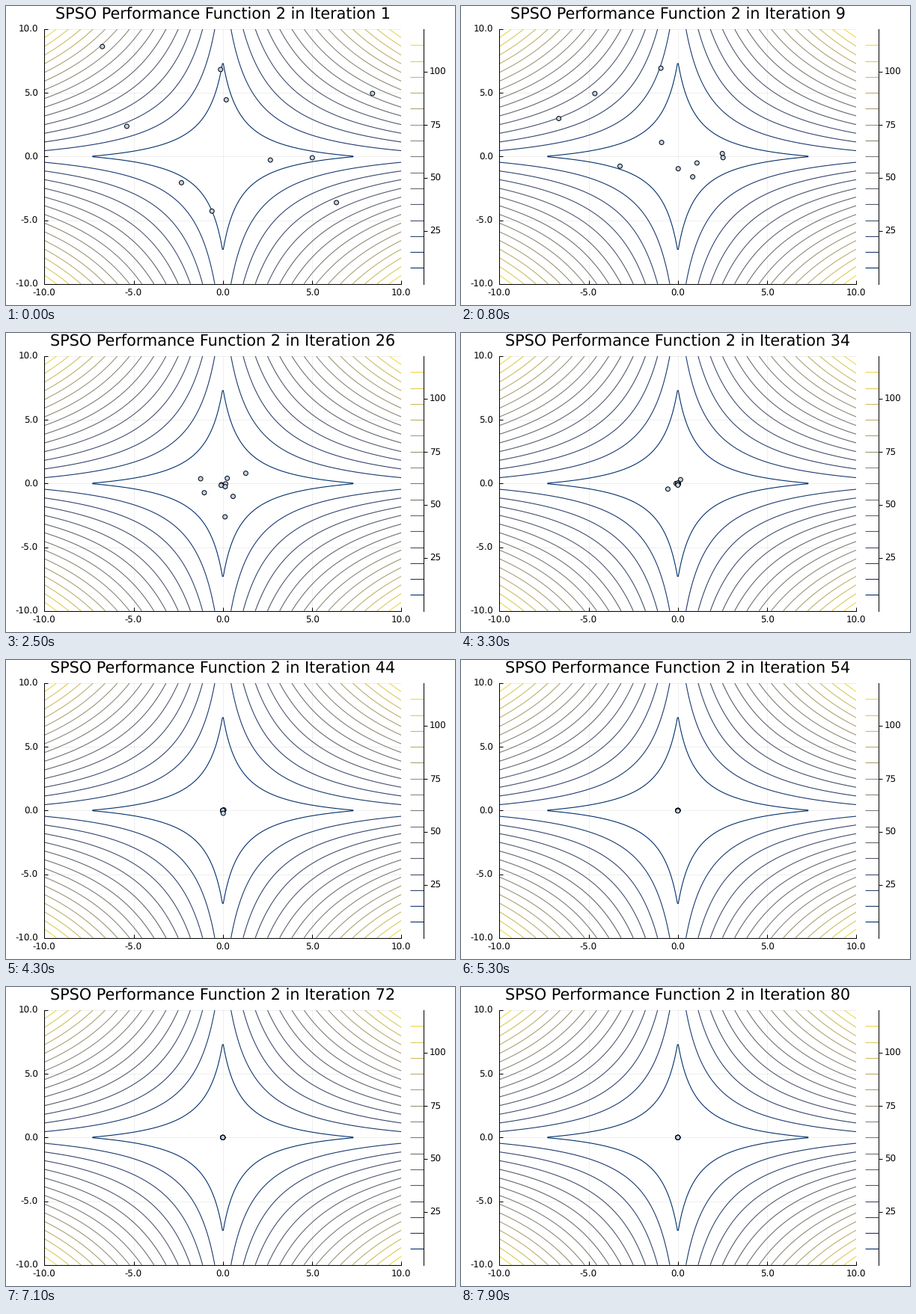
Animation, 600 px wide and 400 px high, one loop 8000 ms. Source, as a matplotlib script:

```python
import matplotlib.pyplot as plt
import numpy as np
from matplotlib.animation import FuncAnimation

W, H, DPI = 600, 400, 100
PX = 72 / DPI
FRAMES, INTERVAL = 80, 100
LEFT, RIGHT, TOP, BOTTOM = 51.2, 528.4, 30.9, 371.7

plt.rcParams.update({"font.family": "DejaVu Sans", "text.hinting": "none"})

# Swarm positions (x + iy) at shared iterations, one entry per particle.
POSES = {
    0: [-6.75 + 8.63j, -0.13 + 6.83j, 0.19 + 4.45j, 8.38 + 4.95j, -5.38 + 2.37j,
        2.66 - 0.28j, 5.01 - 0.10j, -2.32 - 2.06j, -0.61 - 4.29j, 6.36 - 3.62j],
    8: [-4.65 + 4.94j, -0.95 + 6.93j, -0.91 + 1.10j, 2.49 + 0.23j, -6.67 + 2.98j,
        1.07 - 0.51j, 2.53 - 0.09j, -3.24 - 0.76j, 0.02 - 0.96j, 0.83 - 1.60j],
    17: [-5.12 + 4.92j, -0.38 + 1.22j, 0.02 + 0.17j, 1.19 + 0.79j, -0.57 + 0.08j,
         0.10 - 0.21j, 0.38 - 0.25j, -0.48 - 0.60j, 0.21 - 0.50j, 0.34 - 2.44j],
    33: [-0.56 - 0.44j, 0.15 + 0.30j, 0.02 + 0.03j, -0.10, -0.02,
         0.02 - 0.05j, 0.03, -0.01 + 0.02j, -0.10j, -0.13j],
}
# Wide swings of single particles between the shared poses.
SWINGS = {
    0: {4: -8.5 + 6j, 12: -3.2 + 5.6j, 22: 1.8 + 0.5j, 27: -1.2 + 0.6j},
    1: {12: 0.8 - 3j, 23: 0.5 - 0.9j},
    3: {4: -1 + 2j, 12: -1.2 - 0.5j},
    4: {4: -10 + 1.5j, 12: 2.5 - 1j},
    6: {3: 10 + 1j},
    7: {12: 2.1 + 0.8j},
    9: {4: 3 - 10j, 13: -0.5 - 9.27j, 21: 0.3 - 3.64j, 28: -1.41j,
        37: -0.53j, 43: 0.02 - 0.22j, 46: -0.18j},
}


def hermite(knots, t):
    """Smooth path through {time: point}, evaluated at times t."""
    k = np.array(sorted(knots), float)
    z = np.array([knots[i] for i in sorted(knots)], complex)
    m = np.gradient(z, k)
    i = np.clip(np.searchsorted(k, t, side="right") - 1, 0, len(k) - 2)
    h = k[i + 1] - k[i]
    u = (t - k[i]) / h
    return ((1 + 2 * u) * (1 - u) ** 2 * z[i] + u * (1 - u) ** 2 * h * m[i]
            + u * u * (3 - 2 * u) * z[i + 1] + u * u * (u - 1) * h * m[i + 1])


def track(p):
    knots = {n: pose[p] for n, pose in POSES.items()}
    knots.update({43: -0.1 * POSES[33][p], 55: 0, 67: 0, FRAMES: 0})
    knots.update(SWINGS.get(p, {}))
    z = hermite(knots, np.arange(FRAMES))
    return np.clip(np.column_stack([z.real, z.imag]), -10, 10)


tracks = np.array([track(p) for p in range(10)])

fig = plt.figure(figsize=(W / DPI, H / DPI), dpi=DPI, facecolor="white")


def panel(x0, x1):
    return fig.add_axes([x0 / W, 1 - BOTTOM / H, (x1 - x0) / W, (BOTTOM - TOP) / H])


def label(x, y, text, size=11.85, ha="center"):
    return fig.text(x / W, 1 - y / H, text, fontsize=size * PX, ha=ha, va="baseline")


# Contours of |x| + |y| + |x||y|
levels = np.arange(1, 16) * 7.5
ax = panel(LEFT, RIGHT)
g = np.linspace(-10, 10, 400)
X, Y = np.abs(np.meshgrid(g, g))
ax.contour(g, g, X + Y + X * Y, levels, cmap="cividis", vmin=0, vmax=120,
           linewidths=1.1 * PX)
ax.set(xlim=(-10, 10), ylim=(-10, 10))
ticks = np.arange(-10, 11, 5)
ax.set_xticks(ticks, [])
ax.set_yticks(ticks, [])
ax.tick_params(direction="in", length=4.7 * PX, width=PX)
ax.set_axisbelow(True)
ax.grid(color="black", alpha=0.1, lw=0.6 * PX)
ax.spines[["top", "right"]].set_visible(False)
ax.spines[["left", "bottom"]].set_linewidth(PX)
for v in ticks:
    f = (v + 10) / 20
    label(LEFT + f * (RIGHT - LEFT), 387.6, f"{v:.1f}")
    label(42.7, BOTTOM - f * (BOTTOM - TOP) + 4.3, f"{v:.1f}", ha="right")

# Colour scale
bar = panel(540, 558.4)
bar.hlines(levels, 0, 1, colors=plt.cm.cividis(levels / 120), lw=1.1 * PX)
bar.set(xlim=(0, 1), ylim=(0, 120), xticks=[])
bar.yaxis.tick_right()
bar.set_yticks([25, 50, 75, 100], [])
bar.tick_params(length=5 * PX, width=PX)
bar.spines[["left", "top", "bottom"]].set_visible(False)
bar.spines["right"].set_linewidth(PX)
for v in (25, 50, 75, 100):
    label(565.8, BOTTOM - v / 120 * (BOTTOM - TOP) + 4.3, f"{v}", ha="left")

title = label(289.7, 18.2, "", 20.74)
swarm = ax.scatter(*tracks[:, 0].T, s=(5.9 * PX) ** 2, c=["#bdd3ec"] * 10,
                   edgecolors="black", linewidths=PX, zorder=4)


def update(n):
    title.set_text(f"SPSO Performance Function 2 in Iteration {n + 1}")
    swarm.set_offsets(tracks[:, n])
    return title, swarm


anim = FuncAnimation(fig, update, frames=FRAMES, interval=INTERVAL,
                     repeat=True, repeat_delay=0)
plt.show()
```
